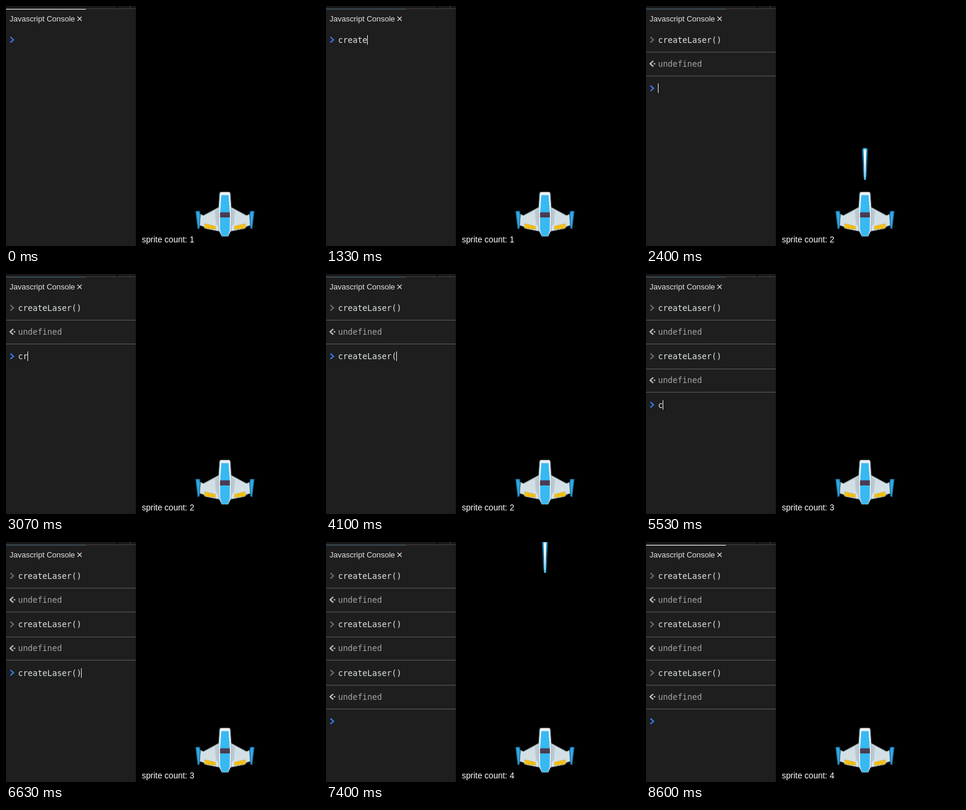
An HTML page with a canvas that plays this animation: 527x403 px, repeating every 8660 ms.

```html
<!DOCTYPE html>
<html lang="en">
<head>
<meta charset="utf-8">
<title>Javascript Console</title>
<style>
html, body { margin: 0; width: 100%; height: 100%; overflow: hidden; background: #000; }
canvas { display: block; }
</style>
</head>
<body>
<canvas id="stage" width="527" height="403"></canvas>
<script>
const ctx = document.getElementById('stage').getContext('2d');
const LOOP = 8660, FPS = 30;
const MONO = '13.6px "DejaVu Sans Mono", monospace';
const SANS = '"Liberation Sans", Arial, sans-serif';
const COMMAND = 'createLaser()';
const TEXT_X = 20.2;
const ROW = 81.4;
const LASER_SPEED = 1.2;
const BLUE = '#357bf0', SKY = '#38b9f2', INK = '#dce3e3';

// Command typed between first and last, then run at enter.
const shots = [
  { first: 830, last: 2170, enter: 2400 },
  { first: 2830, last: 4170, enter: 4617 },
  { first: 5370, last: 6630, enter: 7200 }
];
const caretOn = [[400, 4800], [5370, 7310], [7870, 8430]];

// Typing rhythm: bursts of keys, each starting at a fraction of the typing time.
const bursts = [['c', 0], ['reate', 0.135], ['L', 0.53], ['aser', 0.67], ['()', 0.935]];
const rhythm = bursts.flatMap(([keys, at]) => [...keys].map((_, i) => at + i * 0.06));

const typed = ({ first, last }, t) =>
  rhythm.filter(k => t >= first + k * (last - first) - 1).length;

function rect(x, y, w, h, color) {
  ctx.fillStyle = color;
  ctx.fillRect(x, y, w, h);
}

function text(str, x, y, font, color) {
  ctx.font = font;
  ctx.fillStyle = color;
  ctx.fillText(str, x, y);
}

function trace(points) {
  ctx.beginPath();
  points.forEach(([x, y]) => ctx.lineTo(x, y));
}

function poly(points, fill, stroke, width = 1) {
  trace(points);
  ctx.closePath();
  ctx.fillStyle = fill;
  ctx.fill();
  if (stroke) {
    ctx.lineJoin = 'round';
    ctx.strokeStyle = stroke;
    ctx.lineWidth = width;
    ctx.stroke();
  }
}

// Closed outline from its right half.
const mirror = half => [...half, ...half.map(([x, y]) => [-x, y]).reverse()];

function line(points, color, width) {
  trace(points);
  ctx.lineJoin = 'miter';
  ctx.strokeStyle = color;
  ctx.lineWidth = width;
  ctx.stroke();
}

function fade(height, ...colors) {
  const g = ctx.createLinearGradient(0, 0, 0, height);
  colors.forEach((c, i) => g.addColorStop(i / (colors.length - 1), c));
  return g;
}

function chevron(x, y, dir, color) {
  line([[x - 2.6 * dir, y - 4.6], [x + 2.6 * dir, y], [x - 2.6 * dir, y + 4.6]], color, 2.1);
}

function drawRow(i, t) {
  const top = 49 + i * ROW, y = Math.round(top);
  const shot = shots[i];
  const done = shot && t >= shot.enter;
  const n = shot ? typed(shot, t) : 0;
  chevron(10, top + 7.8, 1, done ? '#6c6c6c' : BLUE);
  text(COMMAND.slice(0, n), TEXT_X, y + 13, MONO, INK);
  if (done) {
    chevron(9.6, top + 48, -1, '#c4c4c4');
    rect(13, top + 47, 2.5, 2.2, '#c4c4c4');
    text('undefined', TEXT_X, y + 53, MONO, '#a3a6a9');
    for (const gap of [28.2, 68]) rect(0, Math.round(top + gap), 218, 1, '#5c5c5c');
  } else if (caretOn.some(([a, b]) => t >= a && t < b)) {
    const x = TEXT_X + ctx.measureText(COMMAND.slice(0, n)).width;
    rect(Math.floor(x), y, 1, 16, '#f0f0f0');
  }
}

function drawConsole(t, fired) {
  rect(0, 0, 218, 403, '#1e1e1e');
  rect(0, 0, 218, 4, '#191919');
  rect(185, 0, 3, 4, '#0c0c0c');
  rect(208, 0, 1, 4, '#3c3c3c');
  rect(0, 4, 218, 1, '#424242');
  rect(0, 5, 134, 1, t < 400 || t >= 8600 ? '#f2f2f2' : '#2d5068');
  text('Javascript Console', 6, 26, '13px ' + SANS, '#e4e4e4');
  line([[120, 18], [127, 25]], '#dcdcdc', 1.2);
  line([[127, 18], [120, 25]], '#dcdcdc', 1.2);
  for (let i = 0; i <= fired; i++) drawRow(i, t);
}

function drawWing() {
  poly([[10, 338], [36, 352], [41, 350], [43, 368], [36, 370], [33, 373.5], [10, 378]],
    '#d3dfe5', '#93a6b0', 1.2);
  poly([[10, 340], [17, 344], [15, 367], [10, 370]], '#b9c9d1');
  poly([[34, 365.5], [16, 370], [16, 375], [33.5, 373]], '#f6c40c', '#cda022', 0.6);
  for (const x of [22, 28]) line([[x, 369], [x, 374]], '#dba90f', 1);
  poly([[48.7, 345], [43, 344.8], [41.7, 351], [43.2, 372.8], [45.2, 373.8]],
    '#32a9e3', '#1c74a6', 1.5);
}

function drawShip() {
  ctx.save();
  ctx.translate(367.5, 0);
  for (const side of [-1, 1]) {
    ctx.save();
    ctx.scale(side, 1);
    drawWing();
    ctx.restore();
  }
  poly(mirror([[7.5, 312.7], [8.7, 315], [10.8, 347], [10.4, 376], [5, 386.4]]),
    '#f0f3f5', '#a7b0b5', 1.2);
  poly(mirror([[6, 317.5], [8.2, 347]]), SKY);
  poly(mirror([[8.2, 355], [8.2, 376], [4.8, 386.4]]), SKY);
  poly(mirror([[8.2, 346.5], [8.4, 355]]), '#493c50');
  ctx.restore();
}

function drawLaser(tail) {
  ctx.save();
  ctx.translate(367.5, tail - 54);
  poly(mirror([[2.6, 0.4], [4.3, 3], [4.1, 26], [3, 42], [1.5, 54]]),
    fade(54, '#43b8ec', '#2585b3', '#174f6c', '#1f6f96', '#3ab5ea'));
  poly(mirror([[1.6, 2], [2.4, 4], [1.9, 34], [1.3, 53]]), '#4cbdee');
  poly(mirror([[1, 3], [1.7, 5], [1.2, 34], [0.6, 50]]), fade(50, '#fff', '#fff', '#8fd9f8'));
  ctx.restore();
}

function drawGame(t, fired) {
  rect(218, 0, 309, 403, '#000');
  for (const { enter } of shots.slice(0, fired)) {
    const tail = 292 - LASER_SPEED * (t - enter);
    if (tail > 0) drawLaser(tail);
  }
  drawShip();
  text('sprite count: ' + (1 + fired), 228, 397, '14px ' + SANS, '#fff');
}

const start = performance.now();
function frame() {
  const now = (performance.now() - start) % LOOP;
  const t = Math.floor((now + 3.4) * FPS / 1000) * 1000 / FPS;
  const fired = shots.filter(s => t >= s.enter).length;
  drawConsole(t, fired);
  drawGame(t, fired);
  requestAnimationFrame(frame);
}
frame();
</script>
</body>
</html>
```
